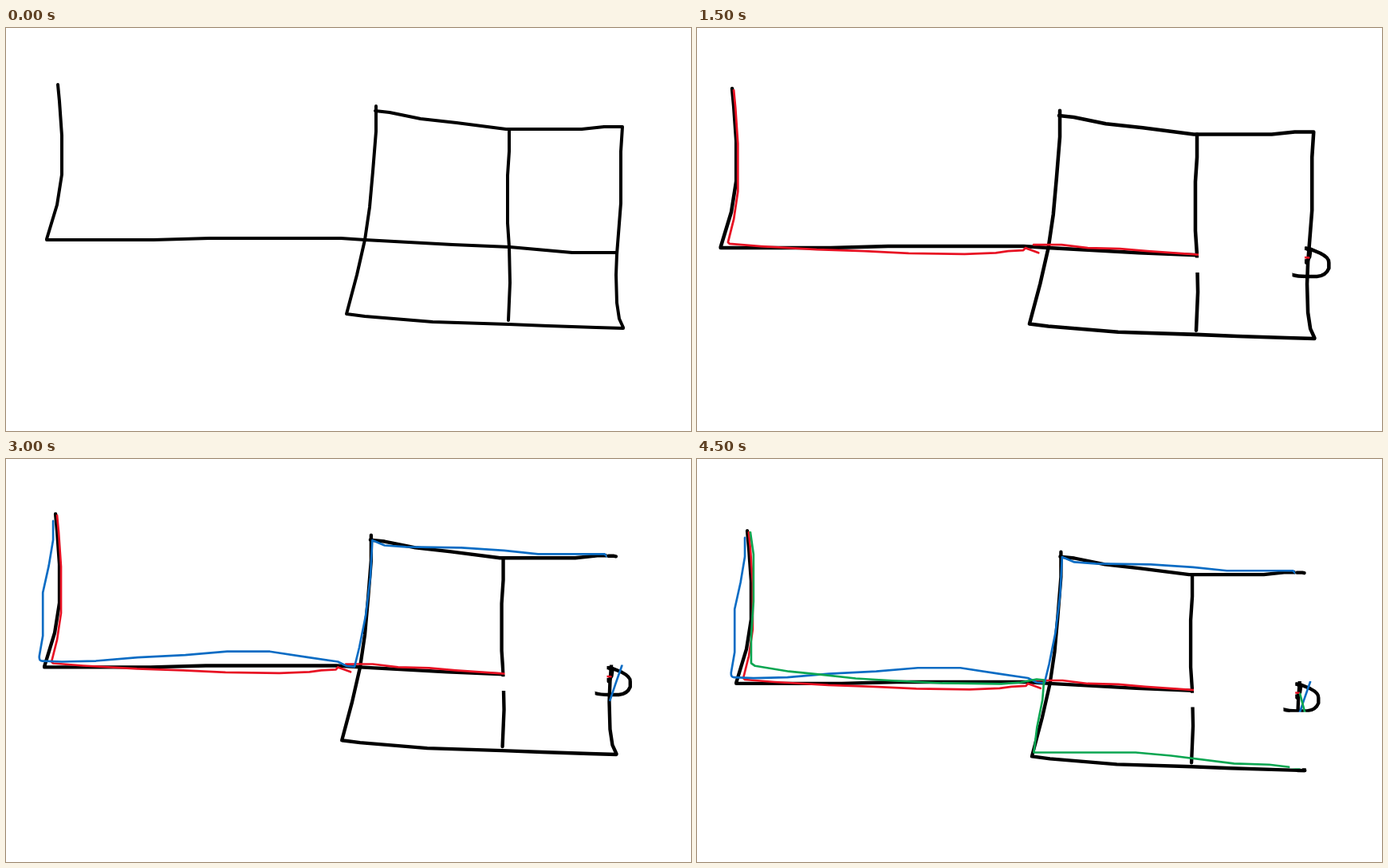
An HTML page with a canvas for the animation above (5250 ms loop, 859 px wide and 506 px high).

```html
<!DOCTYPE html>
<html lang="en">
<head>
<meta charset="utf-8">
<style>
  html, body { margin: 0; width: 100%; height: 100%; overflow: hidden; background: #fff; }
  canvas { display: block; }
</style>
</head>
<body>
<canvas id="stage" width="859" height="506"></canvas>
<script>
const ctx = document.getElementById('stage').getContext('2d');
const HOLD = 750;
const BLACK = '#000', RED = '#e81123', BLUE = '#0a6cc4', GREEN = '#0aa651';

const pen = (color, width, d) => ({ color, width, path: new Path2D(d) });
const ink = d => pen(BLACK, 4.4, d);
const erase = d => ({ path: new Path2D(d) });

// Each step adds strokes or erasures on top of all steps before it.
const steps = [
  [
    ink('M65 71L67 92L70 135V184L64 222L51 265V266H185L255 264H420L450 266L560 272L632 275L710 282H765'),
    ink('M464 98V130L460 180L456 225L450 266L440 310L427 359L450 362L535 369L630 372L680 374L740 376L774 377'),
    ink('M463 104L481 106L520 114L565 119L627 127H722L750 124H773L771 155V220L766 284L765 310L766 345L769 365L774 376'),
    ink('M631 127V155L629 185V245L631 275L632 320L630 367')
  ],
  [
    ink('M768 267L781 272.5Q792 278 791.5 284V291Q788 300 777 301H765Q753 301 747 299Q740 295 740 290V281Q742 272 750 268Q759 266 768 267'),
    ink('M764 266.500L769 270L768 277L764 284'),
    pen(RED, 2.7, 'M67 73L69 94L72 138V197L67 231L60 259L62 261L100 264L168 268L226 270L280 272.5L348 273.500L386 272L401 270L419.5 269L422 266L438 272'),
    pen(RED, 2.7, 'M432 262H466L498 266L537 267L571 270L630 274L691 274.500L737 276.500L767 278')
  ],
  [erase('M633 268V262H762V296H747V306H735V296H627V278H633Z')],
  [pen(BLUE, 2.7, 'M62 80V104L56.5 137L49 171V226L44.5 252Q44 258 48 258L73 259L116 258L169 253.5L229 250.5L282 246H336L385 253.5L422 259L433 264.5L443 265.500L449 241L457 201L463 152L465.500 104.500L481 111L508 113L578 114L632 117.500L675 122H759L765 128L773 168L779 201L782 233L781 264L773 287L766 308')],
  [
    erase('M762 117H792V263H762Z'),
    ink('M764 124.5H771L773.5 125')
  ],
  [pen(GREEN, 2.7, 'M69 73L73 101V161L70 206V240L75 243.500L118 250.500L158 254.500L203 259.500L253 262.5L313 265.500L388 266.500L413 264.500L433 260.500L442.5 261.500L440.500 287L433.500 322L429.5 354H559L604 358L684 368L729 369.5L767 374L771 347L775 322L774 302L768 279')],
  [
    erase('M755 302.5H785V374H755Z'),
    ink('M765 377H774')
  ]
];

// Scale x, scale y, offset x, offset y of the sketch at each step.
const views = [
  [1, 1, 0, 0],
  [.867, .866, 40.6, 29.5],
  [1.03, 1.026, -22.9, 3.2],
  [.929, .925, 22.6, 29.4],
  [.992, .987, -2.4, -1.1],
  [.999, .997, 7.1, 4.2],
  [.986, .984, -1.1, 20.2]
];
const LETTERBOXED = 3;

function draw(index) {
  const [sx, sy, x, y] = views[index];
  ctx.setTransform(1, 0, 0, 1, 0, 0);
  ctx.fillStyle = '#fff';
  ctx.fillRect(0, 0, 859, 506);

  ctx.setTransform(sx, 0, 0, sy, x, y);
  ctx.lineCap = ctx.lineJoin = 'round';
  for (const { color, width, path } of steps.slice(0, index + 1).flat()) {
    if (color) {
      ctx.strokeStyle = color;
      ctx.lineWidth = index ? width : 4;
      ctx.stroke(path);
    } else {
      ctx.fill(path);
    }
  }

  if (index === LETTERBOXED) {
    ctx.setTransform(1, 0, 0, 1, 0, 0);
    ctx.fillStyle = BLACK;
    ctx.fillRect(0, 0, 859, 28);
    ctx.fillRect(0, 479, 859, 27);
  }
}

function tick() {
  draw(Math.floor(performance.now() / HOLD) % views.length);
  requestAnimationFrame(tick);
}
tick();
</script>
</body>
</html>
```
